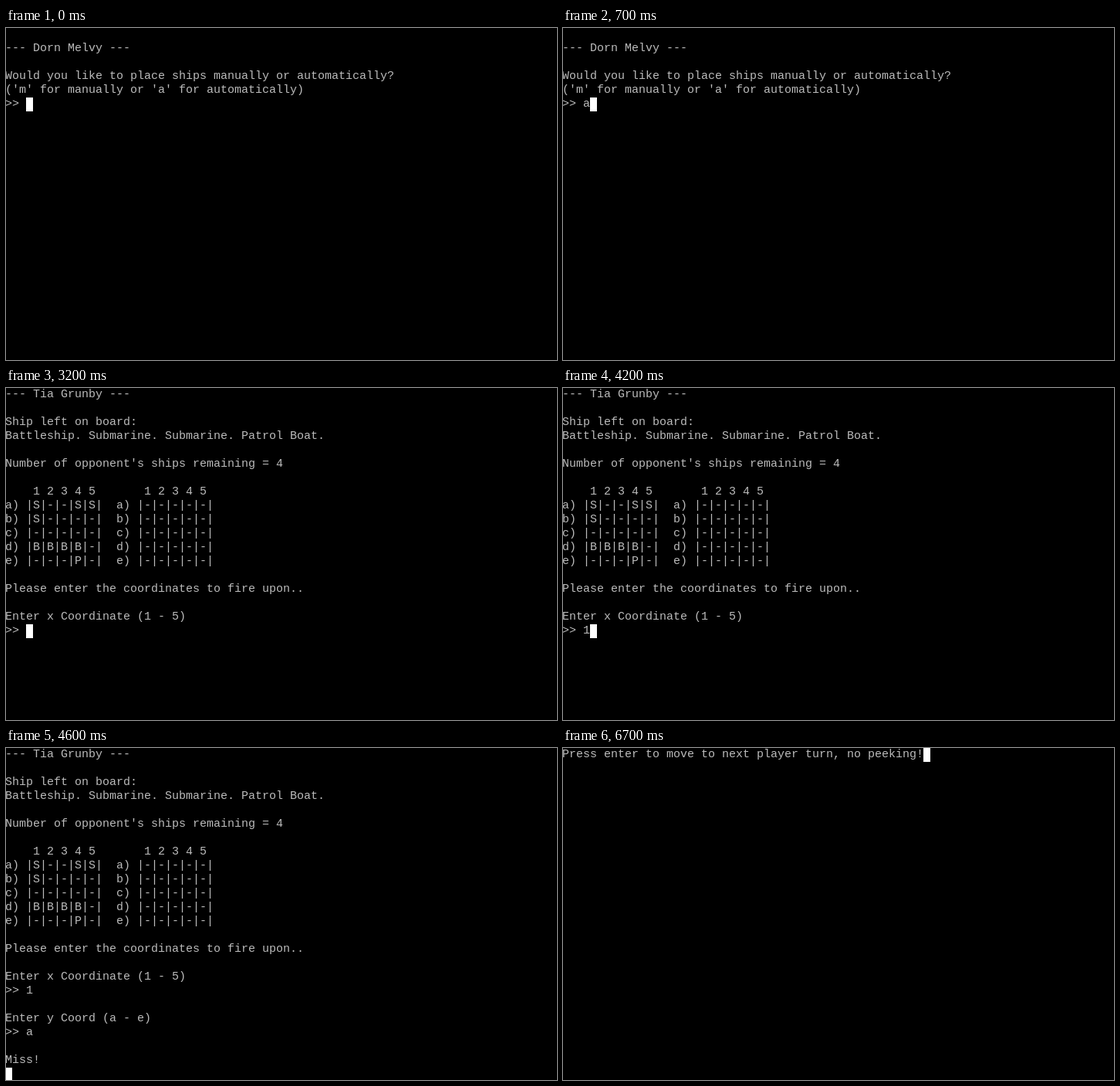
These frames come from a looping animation (714x430 px, 8 s). An HTML page:

```html
<!DOCTYPE html>
<html lang="en">
<head>
<meta charset="utf-8">
<title>Battleships terminal</title>
<style>
  html, body { margin: 0; width: 100%; height: 100%; overflow: hidden; background: #000; }
  #stage { position: relative; width: 714px; height: 430px; overflow: hidden; background: #000; }
  #text {
    position: absolute; left: -1px; top: 0; margin: 0;
    font: 15px/18px "Liberation Mono", "Courier New", monospace;
    font-variant-ligatures: none; color: #bbb; white-space: pre;
  }
  #cursor { position: absolute; left: -1px; top: 0; width: 9px; height: 18px; background: #fff; }
</style>
</head>
<body>
<div id="stage"><pre id="text"></pre><div id="cursor"></div></div>
<script>
const LOOP = 8000, COL = 9, ROW = 18;
const PLAYER_1 = "Tia Grunby", PLAYER_2 = "Dorn Melvy";

const ships = { a: "S--SS", b: "S----", c: "-----", d: "BBBB-", e: "---P-" };
const cells = s => "|" + [...s].join("|") + "|";
const grid = Object.entries(ships)
  .map(([r, s]) => `${r}) ${cells(s)}  ${r}) ${cells("-----")}`);
const header = "    1 2 3 4 5";

const setup = `
--- ${PLAYER_2} ---

Would you like to place ships manually or automatically?
('m' for manually or 'a' for automatically)
>> `;

const turn = [
  `--- ${PLAYER_1} ---`, "",
  "Ship left on board:",
  "Battleship. Submarine. Submarine. Patrol Boat.", "",
  "Number of opponent's ships remaining = 4", "",
  header + "   " + header,
  ...grid, "",
  "Please enter the coordinates to fire upon..", "",
  "Enter x Coordinate (1 - 5)",
  ">> "
].join("\n");
const askY = turn + "1\n\nEnter y Coord (a - e)\n>> ";

// [start ms, terminal content]; the cursor follows the last character
const steps = [
  [0, setup],
  [700, setup + "a"],
  [1000, `Press enter to start the battle, ${PLAYER_2} to start!`],
  [3200, turn],
  [4200, turn + "1"],
  [4300, askY],
  [4500, askY + "a"],
  [4600, askY + "a\n\nMiss!\n"],
  [6700, "Press enter to move to next player turn, no peeking!"]
];

const text = document.getElementById("text");
const cursor = document.getElementById("cursor");
let shown = null;

function show(step) {
  if (step === shown) return;
  shown = step;
  const lines = step[1].split("\n");
  text.textContent = step[1];
  const x = lines.at(-1).length * COL, y = (lines.length - 1) * ROW;
  cursor.style.transform = `translate(${x}px, ${y}px)`;
}

const start = performance.now();
function tick() {
  const t = (performance.now() - start) % LOOP;
  show(steps.findLast(([at]) => at <= t));
  requestAnimationFrame(tick);
}
tick();
</script>
</body>
</html>
```
